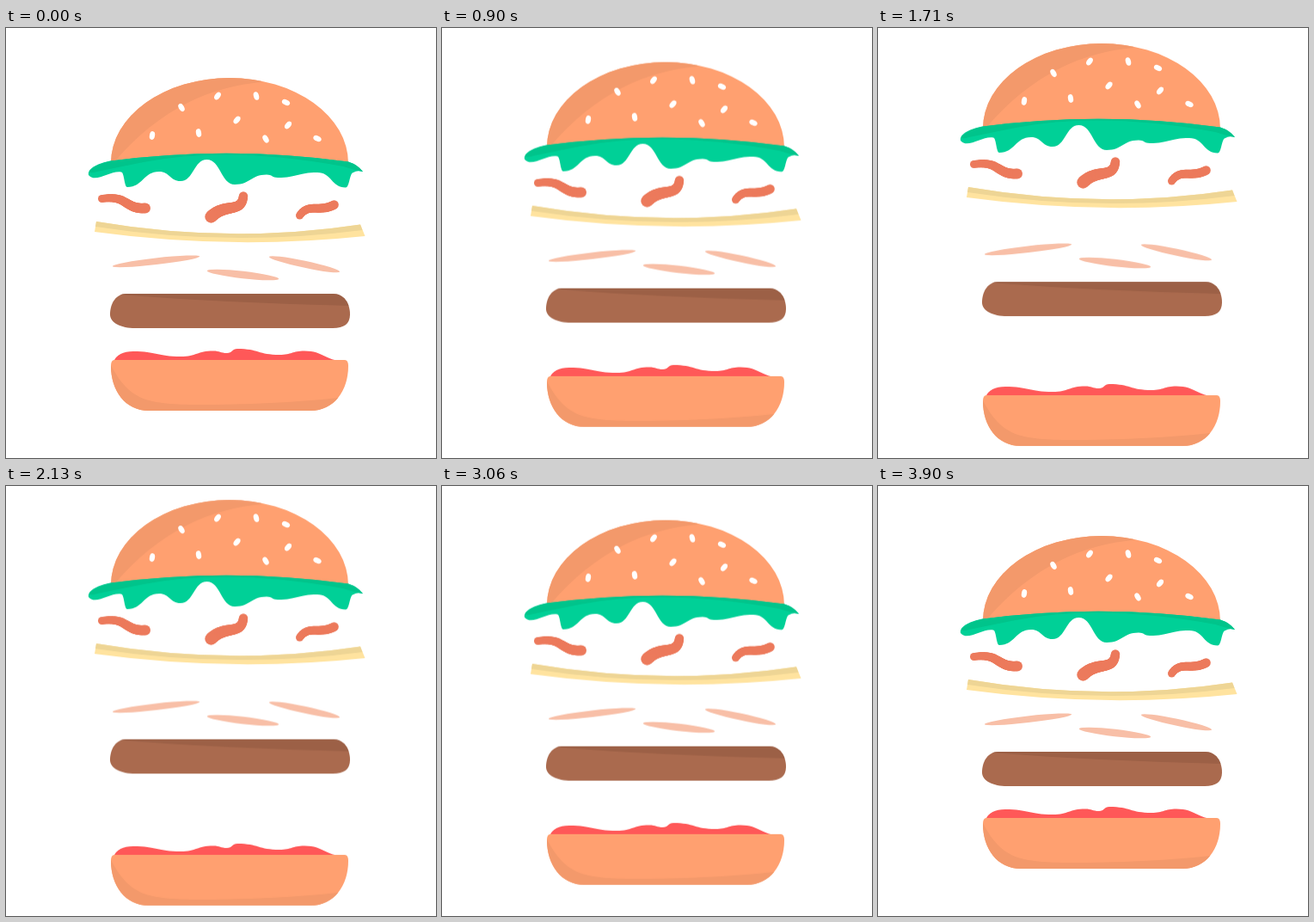
An HTML page for the animation above (3930 ms loop, 500 px wide and 500 px high).

```html
<!DOCTYPE html>
<html lang="en">
<head>
<meta charset="utf-8">
<title>Burger layers</title>
<style>
  html, body { margin: 0; width: 100%; height: 100%; overflow: hidden; background: #fff; }
  svg { display: block; width: 100%; height: 100%; }
  .bread { fill: #ffa070; }
  .crust { fill: #f3996b; }
</style>
</head>
<body>
<svg viewBox="0 0 500 500">
  <defs>
    <path id="dome" d="M122 157A138 99 0 0 1 398 157Q260 138 122 157Z"/>
    <path id="patty" d="M140 309H380C393 309 400 320 400 333C400 344 393 349 380 349H150C134 349 121 343 121 333C121 320 128 309 140 309Z"/>
    <path id="base" d="M126 386H394Q398 386 398 393C398 421 382 445 354 445H166C138 445 122 421 122 393Q122 386 126 386Z"/>
    <clipPath id="inDome"><use href="#dome"/></clipPath>
    <clipPath id="inPatty"><use href="#patty"/></clipPath>
    <clipPath id="inBase"><use href="#base"/></clipPath>
  </defs>
  <g id="top">
    <use href="#dome" class="bread"/>
    <path class="crust" clip-path="url(#inDome)" d="M297 63C240 68 180 92 125 157H100V40H297Z"/>
    <g id="seeds" fill="#fff"></g>
    <path id="lettuce" fill="#00d097"/>
    <path fill="#00c48b" d="M97 166Q108 157 122 154.500Q260 136.500 398 155.500Q409 159 415 167Q404 165 392 161Q260 137 160 156Q140 160 106 167Q96 170 97 166Z"/>
    <g id="bacon" fill="#ec7a5c"></g>
    <path fill="#ffe39f" d="M105 225Q260 251.500 412 228.500L417.500 242Q260 258.500 103 237Z"/>
    <path fill="#eed595" d="M105 225Q260 251.500 412 228.500L414.500 235Q260 255 104 231Z"/>
  </g>
  <g id="middle">
    <g fill="#f8bfa7">
      <ellipse rx="51" ry="3.800" transform="translate(174.500 271.300) rotate(-6.500)"/>
      <ellipse rx="42" ry="4.200" transform="translate(275.500 287) rotate(6.500)"/>
      <ellipse rx="42" ry="4" transform="translate(347 274.700) rotate(12)"/>
    </g>
    <use href="#patty" fill="#aa6a4e"/>
    <path fill="#9c6046" clip-path="url(#inPatty)" d="M130 309H402V323Q260 320 130 310Z"/>
  </g>
  <g id="bottom">
    <path id="ketchup" fill="#ff5858"/>
    <use href="#base" class="bread"/>
    <path class="crust" clip-path="url(#inBase)" d="M122 392C144 434 165 437 220 438Q310 438 386 430V446H120Z"/>
  </g>
</svg>
<script>
const LOOP = 3930, RISE_END = 1965, FALL_START = 2065, FALL_END = 3902;
const $ = id => document.getElementById(id);

function add(parent, tag, attrs) {
  const el = document.createElementNS('http://www.w3.org/2000/svg', tag);
  for (const key in attrs) el.setAttribute(key, attrs[key]);
  parent.append(el);
}

// Wavy edge that is level at each given crest and trough.
function wave(x, y, turns) {
  return turns.map(([nx, ny]) => {
    const mid = (x + nx) / 2;
    const part = `C${mid} ${y} ${mid} ${ny} ${nx} ${ny}`;
    [x, y] = [nx, ny];
    return part;
  }).join('');
}

$('lettuce').setAttribute('d', 'M96 171C94 162 112 156 122 154.5Q260 136.5 398 155.5Q409 159 415 167Q408 165 404 168' +
  wave(404, 168, [[395, 185.5], [362, 168], [316, 174], [303, 170.5], [266, 182],
    [233.5, 153], [203, 178], [178, 167], [141, 185], [134, 167.5]]) + 'C122 165 104 181 96 171Z');

$('ketchup').setAttribute('d', 'M125 388Q130 376 148 376' +
  wave(148, 376, [[203, 382], [241, 375.5], [257, 378], [269, 373], [318, 380], [347, 375.5], [393, 387]]) + 'Z');

// Bacon: a round brush whose radius changes along a curve.
function strip(a, b, c, d, r0, r1, steps = 40) {
  for (let i = 0; i <= steps; i++) {
    const t = i / steps, u = 1 - t;
    const at = k => u ** 3 * a[k] + 3 * u * u * t * b[k] + 3 * u * t * t * c[k] + t ** 3 * d[k];
    add($('bacon'), 'circle', { cx: at(0), cy: at(1), r: r0 + (r1 - r0) * t });
  }
}
strip([111.5, 198.5], [142, 194], [138, 211], [162, 209.5], 4.5, 6);
strip([276, 195.5], [274, 216], [255, 203], [238.5, 219.5], 5.2, 7.2);
strip([381.5, 205.5], [364, 215], [352, 203], [341.5, 218], 5.3, 4.5);

// Seeds: x, y, tilt
for (const [x, y, tilt] of [[204, 92.5, -30], [246, 79, 35], [291, 79, -15], [325.5, 86.5, -65], [268.5, 107, 40],
  [328, 113, 40], [170, 125, 10], [224, 122, -10], [302, 129, -30], [362, 128.5, -65]])
  add($('seeds'), 'ellipse', { rx: 3.1, ry: 4.9, transform: `translate(${x} ${y}) rotate(${tilt})` });

// Each group drifts apart, pauses and comes back.
const ease = 'cubic-bezier(.3333, 0, .6667, 1)';
function drift(id, dy) {
  const home = 'translateY(0px)', away = `translateY(${dy}px)`;
  $(id).animate([
    { transform: home, offset: 0, easing: ease },
    { transform: away, offset: RISE_END / LOOP },
    { transform: away, offset: FALL_START / LOOP, easing: ease },
    { transform: home, offset: FALL_END / LOOP },
    { transform: home, offset: 1 }
  ], { duration: LOOP, iterations: Infinity });
}
drift('top', -42);
drift('middle', -14.6);
drift('bottom', 43);
</script>
</body>
</html>
```
